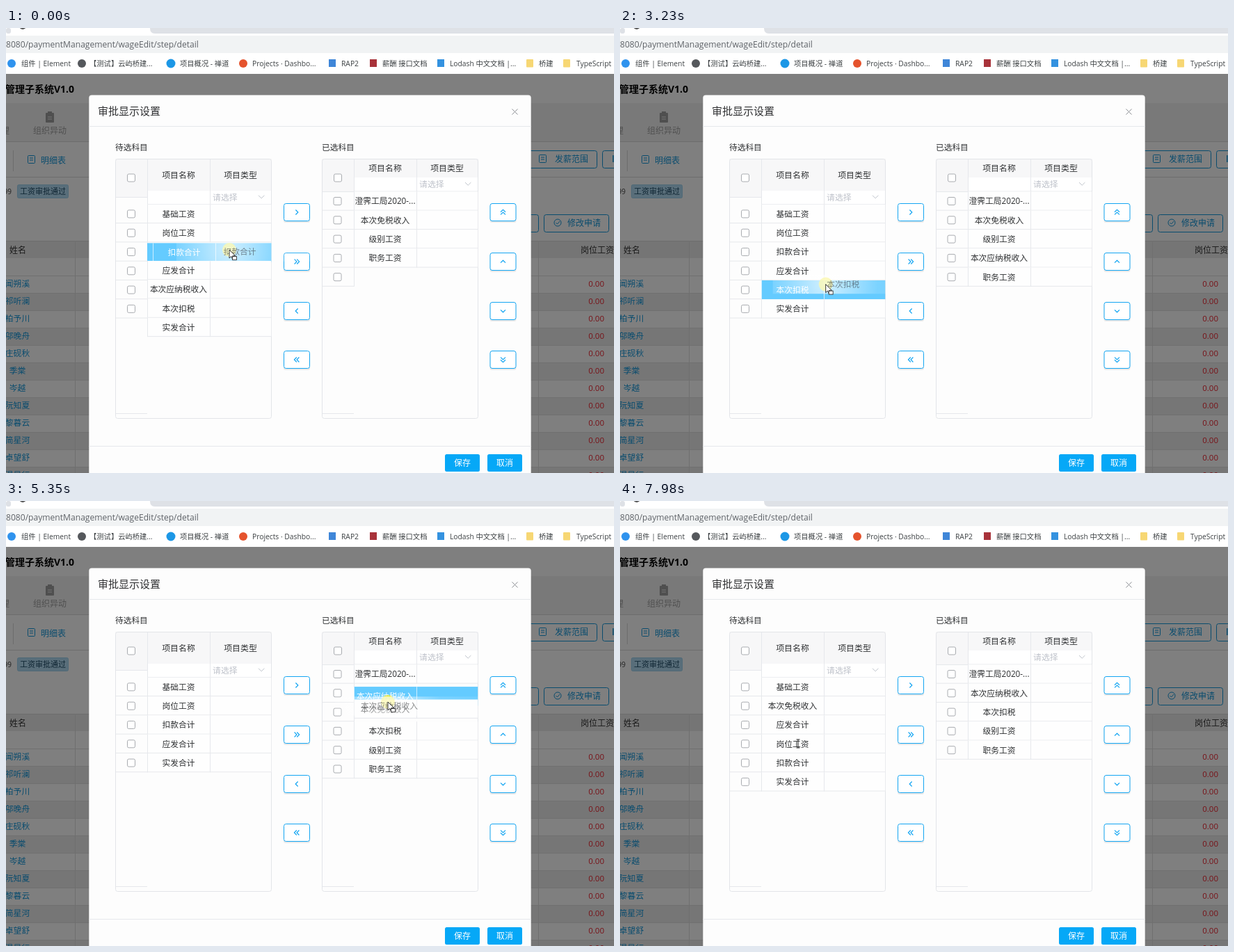
An HTML page for the animation above (8000 ms loop, 874 by 640 pixels).

```html
<!DOCTYPE html>
<html lang="zh-CN">
<head>
<meta charset="utf-8">
<title>审批显示设置</title>
<style>
html, body { margin: 0; width: 100%; height: 100%; overflow: hidden; background: #fff; }
svg { display: block; width: 100vw; height: 100vh; }
text { font-family: "Open Sans", "Noto Sans CJK SC", "Noto Sans CJK", sans-serif; white-space: pre; }
</style>
</head>
<body>
<svg viewBox="0 0 874 640" xmlns="http://www.w3.org/2000/svg">
  <defs>
    <clipPath id="clipL"><rect x="203" y="253" width="178.5" height="308"/></clipPath>
    <clipPath id="clipR"><rect x="500" y="235" width="178.5" height="326"/></clipPath>
    <radialGradient id="haze" gradientUnits="userSpaceOnUse" cx="0" cy="0" r="150">
      <stop offset="0" stop-color="#fff" stop-opacity=".7"/>
      <stop offset=".5" stop-color="#fff" stop-opacity=".15"/>
      <stop offset="1" stop-color="#fff" stop-opacity=".06"/>
    </radialGradient>
  </defs>
  <g id="page"></g>
  <g id="dialog"></g>
  <g id="live"></g>
</svg>
<script>
const LOOP = 8000, ROW = 27.3, GLIDE = 150, SIZE = 11.75;
const BLUE = '#13a5f2', LINE = '#e6e8ec', INK = '#2f3133';

const rect = (x, y, w, h, fill, more = '') =>
  `<rect x="${x}" y="${y}" width="${w}" height="${h}" fill="${fill}" ${more}/>`;
const frame = (x, y, w, h, stroke, fill = 'none', r = 3) =>
  rect(x + .5, y + .5, w - 1, h - 1, fill, `stroke="${stroke}" rx="${r}"`);
const path = (d, stroke, more = '') => `<path d="${d}" fill="none" stroke="${stroke}" ${more}/>`;
const hLine = (x1, x2, y, color = LINE) => rect(x1, y, x2 - x1, 1, color);
const vLine = (x, y1, y2, color = LINE) => rect(x, y1, 1, y2 - y1, color);
const disc = (x, y, r, fill, more = '') => `<circle cx="${x}" cy="${y}" r="${r}" fill="${fill}" ${more}/>`;
// cy is the optical middle of the line
const text = (x, cy, str, size = SIZE, fill = INK, anchor = 'start', more = '') =>
  `<text x="${x}" y="${cy + size * .38}" font-size="${size}" fill="${fill}" text-anchor="${anchor}" ${more}>${str}</text>`;
const mid = (x, cy, str, size, fill, more) => text(x, cy, str, size, fill, 'middle', more);
const checkbox = (x, y) => frame(x - 6, y - 6, 12, 12, '#a9acb0', '#fff', 2);

function browserBar() {
  const mark = (x, label, icon) => icon + text(x, 51, label, 10.3, '#3c4043');
  const square = (x, fill) => rect(x, 45, 10, 11, fill);
  const folder = x => rect(x, 45, 10, 11.5, '#f7d774', 'rx="1"');
  return rect(0, 0, 874, 66, '#fff') +
    rect(0, 0, 7, 8, '#dee1e6', 'rx="3"') +
    `<path d="M207 0H874V8H214Q207 8 207 0" fill="#dee1e6"/>` +
    disc(24, -3, 5, '#555') +
    rect(-10, 11, 894, 25, '#f1f3f4') +
    text(0, 23.5, '8080/paymentManagement/wageEdit/step/detail', 12.1, '#5f6368') +
    mark(22, '组件 | Element', disc(8, 51, 6, '#2f93ee')) +
    mark(120, '【测试】云屿桥建...', disc(109, 51, 6, '#55585c')) +
    mark(250, '项目概况 - 禅道', disc(237, 51, 6.5, '#1c97e6')) +
    mark(354, 'Projects · Dashbo...', disc(341, 51, 6, '#e5532d')) +
    mark(482, 'RAP2', square(464, '#3f86d8')) +
    mark(541, '薪酬 接口文档', square(523, '#a8323a')) +
    mark(638, 'Lodash 中文文档 |...', square(620, '#3492e0')) +
    mark(766, '桥建', folder(748)) +
    mark(820, 'TypeScript', folder(801));
}

function backPage() {
  const link = '#1399dd', rule = '#d9d9d9', faint = '#a0a0a0';
  const people = ['闻朔溪', '祁听澜', '柏予川', '邬晚舟', '庄砚秋', '季棠', '岑越', '阮知夏', '黎暮云', '简星河', '卓望舒', '温景行'];
  const doc = (x, y) => frame(x - 6, y - 6, 11, 12, link, 'none', 1) +
    path(`M${x - 3} ${y - 2}h5M${x - 3} ${y + 1}h5`, link);
  let s = rect(0, 66, 874, 574, '#fff') +
    text(98, 88, '管理子系统V1.0', 14, '#000', 'end', 'font-weight="700"') +
    rect(0, 108, 874, 55, '#f3f3f3') + hLine(0, 874, 163, rule) +
    rect(57, 122, 12, 14, faint, 'rx="1"') + rect(60, 120, 6, 4, faint) +
    path('M60 128h6M60 131h6', '#eee') +
    mid(63, 147, '组织异动', 12, faint) + text(5, 147, '理', 12, faint, 'end') +
    vLine(10, 176, 206, rule) + doc(37, 189) + text(50, 190, '明细表', 12, link) +
    hLine(0, 874, 214, rule) + text(8, 235, '99', 10, '#444', 'end') +
    frame(16, 225, 74, 20, '#9fd4f0', '#b4def5', 2) + mid(53, 235, '工资审批通过', 11, '#1d4a66') +
    frame(740, 176, 110, 26, link) + doc(772, 188) + text(789, 188, '发薪范围', 12, link) +
    frame(857, 176, 60, 26, link) + rect(872, 183, 1.5, 10, link) +
    frame(700, 268, 66, 26, link) + frame(773, 268, 94, 26, link) +
    `<circle cx="793" cy="280" r="5" fill="none" stroke="${link}"/>` +
    path('M790.5 280l2 2l3.5-4', link) + text(807, 280.5, '修改申请', 12, link) +
    rect(0, 306, 874, 25, '#ebebeb') + hLine(0, 874, 306, rule) +
    text(5, 319, '姓名', 12, '#333') + text(826, 319, '岗位工资', 12, '#333');
  people.forEach((name, i) => {
    const y = 368 + 25 * i;
    if (i % 2) s += rect(0, y - 12, 874, 25, '#ededed');
    s += hLine(0, 874, y - 12, '#e2e2e2') + mid(16.5, y, name, 11.8, link) +
      text(860, y, '0.00', 11.5, '#f0202c', 'end');
  });
  return s + vLine(99, 306, 640, '#e0e0e0') + vLine(765, 306, 640, '#e0e0e0') +
    rect(0, 66, 874, 574, '#000', 'opacity=".5"');
}

function arrowButton(x, y, angle, double) {
  const tip = dx => `M${dx - 1.6} -3.5L${dx + 1.8} 0L${dx - 1.6} 3.5`;
  return rect(x - 19, y - 11, 38, 26, '#000', 'rx="3" opacity=".08"') +
    frame(x - 19, y - 13, 38, 26, BLUE, '#fff') +
    `<g transform="translate(${x} ${y}) rotate(${angle})">` +
    path(double ? tip(-1.8) + tip(1.8) : tip(0), BLUE, 'stroke-width="1.2"') + '</g>';
}

// x: outer left, col: first data column, head: header bottom, top: first row top
function tableShell(x, col, head, top, checkBottom) {
  const right = x + 225, grey = '#f7f7f8', titleY = (188 + head) / 2;
  return rect(x, 188, 225, 374, '#fdfdfd') +
    rect(x, 188, 225, head - 188, grey) + rect(x, 188, col - x, checkBottom - 188, grey) +
    rect(col, head, right - col, top - head, '#fff') +
    hLine(x, col, checkBottom) + hLine(col, right, top - .5) +
    vLine(col, 188, top) + vLine(col + 90, 188, top) +
    mid(col + 45, titleY, '项目名称', 11.9) + mid(col + 134, titleY, '项目类型', 11.9) +
    text(col + 94, (head + top) / 2 - .5, '请选择', 11.9, '#c0c4cc') +
    path(`M${col + 160} ${(head + top) / 2 - 3}l4.2 4.2l4.2-4.2`, '#c0c4cc') +
    checkbox(x + 23, 215.5) +
    hLine(x, col, 554) + frame(x, 188, 225, 374, '#e3e5e9');
}

function dialog() {
  const ys = [265, 336, 407, 477];
  const left = [[0, 0], [0, 1], [180, 0], [180, 1]], right = [[-90, 1], [-90, 0], [90, 0], [90, 1]];
  const action = (x, label) => rect(x, 613, 50, 25, '#06a8f7', 'rx="2.5"') + mid(x + 25, 625.5, label, 12, '#fff');
  return rect(119.3, 96.6, 635.4, 560, '#fdfdfd', 'rx="4"') +
    text(132, 119, '审批显示设置', 15, '#303133') +
    path('M727.5 116.5l8 8m0-8l-8 8', '#8c8f94') +
    hLine(119.3, 754.7, 141) + hLine(119.3, 754.7, 601) +
    text(157, 171.5, '待选科目', 11.7) + text(454, 171.5, '已选科目', 11.7) +
    tableShell(157, 203, 234, 253.5, 243) + tableShell(454, 500, 215, 235, 235) +
    ys.map((y, i) => arrowButton(418, y, ...left[i]) + arrowButton(714.5, y, ...right[i])).join('') +
    action(631, '保存') + action(692, '取消');
}

const lists = {
  L: { x: 203, cy: 267.4, checkX: 180, start: ['基础工资', '岗位工资', '应发合计', '本次应纳税收入', '本次扣税', '实发合计'] },
  R: { x: 500, cy: 249, checkX: 476.5, start: ['澄霁工局2020-...', '本次免税收入', '级别工资', '职务工资', '扣款合计'] }
};

// time, item, list, new index
const moves = [
  [-104, '扣款合计', 'L', 2],
  [1290, '本次应纳税收入', 'L', 5],
  [1500, '本次应纳税收入', 'R', 3],
  [3506, '本次扣税', 'R', 3],
  [3730, '本次扣税', 'R', 2],
  [4850, '本次应纳税收入', 'R', 3],
  [5060, '本次应纳税收入', 'R', 2],
  [5283, '本次应纳税收入', 'R', 1],
  [6170, '本次免税收入', 'L', 1],
  [7520, '应发合计', 'L', 3],
  [7640, '应发合计', 'L', 2]
];

// press, drag start, release, drop; dx and dy lead from pointer to ghost text
const drags = [
  { item: '扣款合计', press: -900, start: -800, up: 70, drop: 70, dx: 15, dy: 3 },
  { item: '本次应纳税收入', press: 1040, start: 1230, up: 2210, drop: 2280, dx: 4, dy: -8 },
  { item: '本次扣税', press: 3060, start: 3130, up: 4080, drop: 4080, dx: 25, dy: 0 },
  { item: '本次应纳税收入', press: 4630, start: 4700, up: 5480, drop: 5480, dx: 2, dy: 6 },
  { item: '本次免税收入', press: 5750, start: 5850, up: 6630, drop: 6630, dx: 14, dy: -1 },
  { item: '应发合计', press: 7300, start: 7430, up: 7780, drop: 7780, dx: -18, dy: 6 }
];

const pointerPath = [
  [0, 321, 319], [270, 321, 319], [890, 264, 389], [1230, 264, 389], [1290, 330, 395],
  [1360, 414, 382], [1520, 500, 350], [1700, 546, 334], [1900, 546, 329], [2350, 546, 329],
  [2990, 225, 376], [3130, 225, 376], [3280, 330, 365], [3430, 520, 330], [3540, 640, 316],
  [3620, 630, 314], [3850, 590, 300], [4130, 590, 300], [4490, 543, 352], [4700, 543, 352],
  [5000, 548, 325], [5350, 549, 289], [5400, 549, 287], [5520, 549, 287], [5720, 531, 305],
  [5850, 531, 305], [6230, 330, 293], [6400, 317, 291], [6680, 317, 291], [7250, 266, 370],
  [7450, 266, 370], [7700, 267, 320], [7950, 267, 320], [7980, 256, 349], [8000, 256, 349]
];

function pointerAt(t) {
  const i = pointerPath.findIndex(k => k[0] > t);
  const [t0, x0, y0] = pointerPath[i - 1], [t1, x1, y1] = pointerPath[i];
  const p = (t - t0) / (t1 - t0);
  return { x: x0 + (x1 - x0) * p, y: y0 + (y1 - y0) * p };
}

const placeOf = (order, key, item) => ({ x: lists[key].x, y: lists[key].cy + ROW * order[key].indexOf(item) });
const keyOf = (order, item) => order.L.includes(item) ? 'L' : 'R';

function orderAt(t) {
  let order = { L: lists.L.start, R: lists.R.start }, before = order, since = -Infinity;
  for (const [time, item, key, index] of moves) {
    if (time > t) break;
    before = order;
    order = { L: order.L.filter(n => n !== item), R: order.R.filter(n => n !== item) };
    order[key].splice(index, 0, item);
    since = time;
  }
  return { order, before, left: (1 - Math.min(1, (t - since) / GLIDE)) ** 3 };
}

function row(item, x, y, active) {
  const top = y - ROW / 2, line = active ? '#cfeeff' : LINE;
  return rect(x - (active ? 20 : 0), top, active ? 198.5 : 178.5, ROW, active ? '#64cbff' : '#fefefe') +
    (active ? '' : hLine(x, x + 178.5, top + ROW - 1)) +
    vLine(x, top, top + ROW, line) + vLine(x + 90, top, top + ROW, line) +
    mid(x + 45, y, item, SIZE, active ? '#fff' : INK);
}

function listRows(key, state, active) {
  const { order, before, left } = state;
  return `<g clip-path="url(#clip${key})">` + order[key].map(item => {
    const to = placeOf(order, key, item), from = placeOf(before, keyOf(before, item), item);
    return row(item, to.x + (from.x - to.x) * left, to.y + (from.y - to.y) * left, item === active);
  }).join('') + '</g>';
}

function checks(key, count) {
  const { x, cy, checkX } = lists[key];
  let s = vLine(x, cy - ROW / 2, cy + ROW * (count - .5));
  for (let i = 0; i < count; i++)
    s += checkbox(checkX, cy + ROW * i) + hLine(x - 45, x, cy + ROW * (i + .5) - 1);
  return s;
}

function ghost({ x, y }, { item, dx, dy }) {
  return `<g transform="translate(${x} ${y})">` +
    rect(-76, dy - ROW / 2, 230, ROW, 'url(#haze)') +
    mid(dx, dy, item, SIZE, INK, 'opacity=".55"') + '</g>';
}

function pointer({ x, y }, dragging, overText) {
  const outside = (x > 384 && x < 495) || x > 682;
  let s = `<g transform="translate(${x} ${y})">`;
  if (dragging && outside) {
    s += '<circle r="5.3" fill="none" stroke="#222" stroke-width="1.7"/>' + path('M-3.7 -3.7L3.7 3.7', '#222', 'stroke-width="1.7"');
  } else if (overText) {
    s += path('M-2.5 -6H2.5M0 -6V6M-2.5 6H2.5', '#222');
  } else {
    s += '<path d="M0 0V12L2.8 9.4L4.8 13.8L6.8 12.9L4.9 8.7H8.7Z" fill="#fff" stroke="#222" stroke-width=".9"/>';
    if (dragging) s += rect(4.5, 9.5, 6, 5, '#fff', 'stroke="#333" stroke-width=".9"');
  }
  return s + '</g>';
}

function scene(t) {
  const state = orderAt(t), at = pointerAt(t);
  const drag = drags.find(d => t >= d.press && t < d.drop);
  const committed = orderAt(drag ? drag.press : t).order;
  // the check columns follow only when a drop is done
  const count = { L: committed.L.length, R: committed.R.length };
  const active = drag && t >= drag.start ? drag.item : null;
  const pressed = !!drag && t < drag.up, dragging = pressed && !!active;
  const overText = !drag && ['L', 'R'].some(k => Math.abs(at.x - lists[k].x - 45) < 30);
  return checks('L', count.L) + checks('R', count.R) +
    listRows('L', state, active) + listRows('R', state, active) +
    (pressed ? disc(at.x, at.y, 10, '#f6ec28', 'opacity=".8"') : '') +
    (dragging ? ghost(at, drag) : '') +
    pointer(at, dragging, overText);
}

const layer = id => document.getElementById(id);
layer('page').innerHTML = backPage() + browserBar();
layer('dialog').innerHTML = dialog();

function tick() {
  layer('live').innerHTML = scene(performance.now() % LOOP);
  requestAnimationFrame(tick);
}
tick();
</script>
</body>
</html>
```
